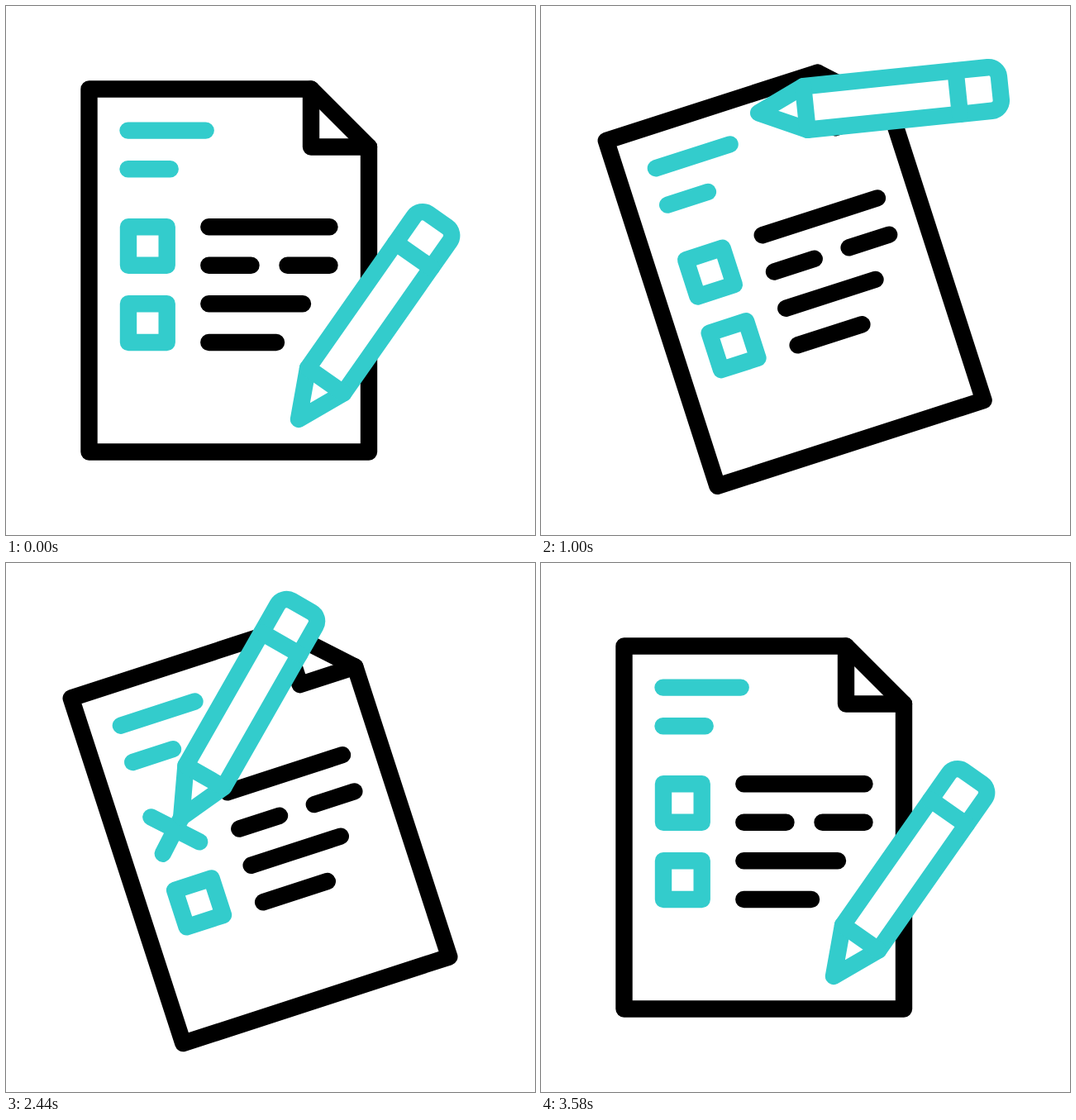
Animation, 640 px wide and 640 px high, one loop 3.6 s. Source, as an HTML page:

```html
<!DOCTYPE html>
<html lang="en">
<head>
<meta charset="utf-8">
<title>Checklist</title>
<style>
  html, body { margin: 0; width: 100%; height: 100%; overflow: hidden; background: #fff; }
  svg { display: block; width: 100vw; height: 100vh; }
  g { fill: none; stroke: #000; stroke-width: 20.4; stroke-linecap: round; stroke-linejoin: round; }
  .teal { stroke: #3cc; }
</style>
</head>
<body>
<svg viewBox="0 0 640 640">
  <g id="page">
    <path fill="#fff" d="M100.5 100.5H369L439 170.5V539.5H100.5Z"/>
    <path d="M369 100.5V170.5H439"/>
    <path d="M245.3 267.2H391.5M245.3 313.7H296.5M340.5 313.7H391.5M245.3 360.2H359M245.3 407H327"/>
    <g class="teal">
      <path d="M147.5 150.6H241.7M147.5 197.2H198.7M148 360.2H194.7V407H148Z"/>
      <path id="box" d="M148 267.2H194.7V313.8H148Z"/>
      <path id="cross"/>
    </g>
  </g>
  <g id="pencil" class="teal">
    <path fill="#fff" d="M0 0L-26.4 -57V-281.2A12.5 12.5 0 0 1 -13.9 -293.7H13.9A12.5 12.5 0 0 1 26.4 -281.2V-57Z"/>
    <path d="M-26.4 -57H26.4M-26.4 -242.3H26.4"/>
  </g>
</svg>
<script>
const LOOP = 3600, TILT = 18, SHIFT = 37.75;
const el = id => document.getElementById(id);
const page = el('page'), box = el('box'), cross = el('cross'), pencil = el('pencil');

const span = (t, a, b) => Math.min(1, Math.max(0, (t - a) / (b - a)));
const mix = (a, b, k) => a + (b - a) * k;
const smooth = u => u * u * (3 - 2 * u);
const cubic = (a, b, c, d, k) => {
  const m = 1 - k;
  return m * m * m * a + 3 * m * m * k * b + 3 * m * k * k * c + k * k * k * d;
};

// Ease with flat ends and handles at x1 and x2
function ease(u, x1, x2) {
  let lo = 0, hi = 1;
  for (let i = 0; i < 24; i++) {
    const mid = (lo + hi) / 2;
    if (cubic(0, x1, x2, 1, mid) < u) lo = mid; else hi = mid;
  }
  return smooth((lo + hi) / 2);
}

// Pencil poses: tip x, tip y, tilt in degrees
const rest = [354, 500, 35], high = [264, 128, 84.5], start1 = [162.5, 297.5, 35.7],
      end1 = [235, 337, 21], start2 = [182, 355, 31], end2 = [223.8, 289.5, 29.2],
      away = [374, 320, 9];
const blend = (p, q, k) => p.map((v, i) => mix(v, q[i], k));

function pose(t) {
  if (t < 980) {
    const k = ease(t / 980, .33, .1), p = blend(rest, high, k);
    p[1] = mix(rest[1], high[1], 1 - Math.pow(1 - k, 1.5));
    return p;
  }
  if (t < 1380) return blend(high, start1, smooth(span(t, 980, 1380)));
  if (t < 1780) return blend(start1, end1, smooth(span(t, 1380, 1780)));
  if (t < 2180) {
    const k = smooth(span(t, 1780, 2180));
    return [
      cubic(end1[0], 260, 180, start2[0], k),
      cubic(end1[1], 320, 335, start2[1], k),
      mix(end1[2], start2[2], k)
    ];
  }
  if (t < 2580) return blend(start2, end2, smooth(span(t, 2180, 2580)));
  if (t < 2980) {
    const k = smooth(span(t, 2580, 2980)), p = blend(end2, away, k);
    p[1] -= 40 * k * (1 - k);
    return p;
  }
  return blend(away, rest, smooth(span(t, 2980, 3580)));
}

const stroke = (x1, y1, x2, y2, k) =>
  k > 0 ? `M${x1} ${y1}L${mix(x1, x2, k)} ${mix(y1, y2, k)}` : '';

function draw(t) {
  const back = span(t, 2580, 3580);
  const come = ease(span(t, 0, 1160), .33, .05);
  const turn = TILT * (come - ease(back, .22, .66));
  const move = SHIFT * (come - smooth(back));
  page.setAttribute('transform', `translate(${move} 0) rotate(${-turn} 269.75 320)`);

  const swap = span(t, 3080, 3280);
  box.setAttribute('opacity', 1 - span(t, 1380, 1460) + swap);
  cross.setAttribute('opacity', 1 - swap);
  cross.setAttribute('d',
    stroke(148, 267.2, 194.7, 313.8, smooth(span(t, 1380, 1780))) +
    stroke(148, 313.8, 194.7, 267.2, smooth(span(t, 2180, 2580))));

  const [x, y, a] = pose(t);
  pencil.setAttribute('transform', `translate(${x} ${y}) rotate(${a})`);
}

const t0 = performance.now();
function tick(now) {
  draw(Math.max(0, now - t0) % LOOP);
  requestAnimationFrame(tick);
}
draw(0);
requestAnimationFrame(tick);
</script>
</body>
</html>
```
